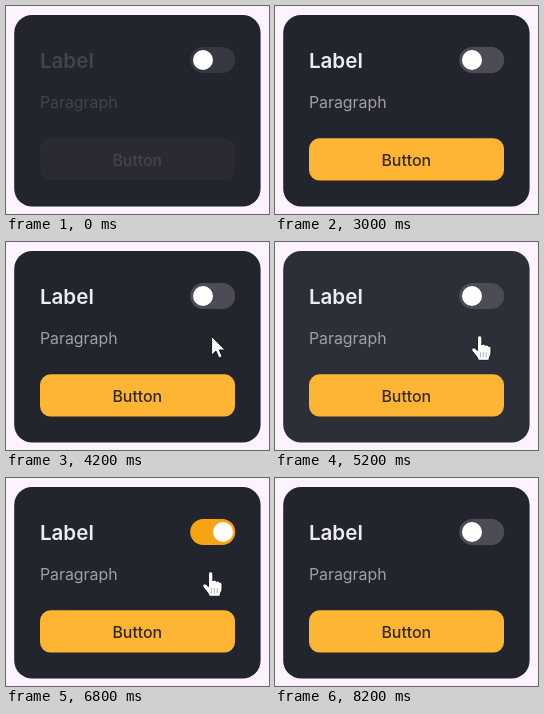
Animation, 263 px wide and 208 px high, one loop 8.9 s. Source, as an HTML page:

```html
<!DOCTYPE html>
<html lang="en">
<head>
<meta charset="utf-8">
<title>Card states</title>
<style>
  html, body { margin: 0; width: 100%; height: 100%; overflow: hidden; background: #fdf3fe; }
  svg { display: block; width: 100vw; height: 100vh; }
  text { font-family: Inter, Roboto, sans-serif; font-size: 15.9px; }
  .cursor path { fill: #fff; stroke: #15161c; stroke-width: 1; stroke-linejoin: round; }
  .cursor .crease { fill: none; stroke: #8b8b92; stroke-width: .7; stroke-linecap: round; }
</style>
</head>
<body>
<svg viewBox="0 0 263 208">
  <rect id="card" x="8.2" y="9" width="246.4" height="191.5" rx="18"/>
  <text id="label" x="33.9" y="62.2" style="font-size:20.6px;font-weight:600">Label</text>
  <text id="para" x="33.9" y="102.3">Paragraph</text>
  <rect id="track" x="184.2" y="41" width="45" height="26" rx="13"/>
  <circle id="knob" cy="54" r="10" fill="#fff"/>
  <rect id="button" x="34" y="132.3" width="195" height="42.3" rx="10.5"/>
  <text id="caption" x="131.3" y="160" text-anchor="middle" style="font-weight:500">Button</text>
  <g id="arrow" class="cursor">
    <path d="M.6 .4V19.2L5 15.1L7.9 22L11.2 20.6L8.3 14H14.2Z"/>
  </g>
  <g id="hand" class="cursor">
    <path d="M-2.6 2C-2.6 -.9 1.9 -.9 1.9 2V9C2.2 7.7 5.2 7.8 5.5 9.6C6 8.5 8.4 8.8 8.7 10.5C9.4 9.8 11 10.4 11 12.3V17C11 19.4 9 20.6 9 24.3H-1.8C-2 21.5 -4.5 19.5 -7.6 15.3C-9.4 12.7 -6.6 10.8 -4.6 12.6L-2.6 14.6Z"/>
    <path class="crease" d="M.4 16.5V21M3.3 16.5V21M6.2 16.5V21"/>
  </g>
</svg>
<script>
const LOOP = 8900;
const $ = id => document.getElementById(id);
const dark = [34, 36, 46], light = [45, 47, 56];
const trackOff = [77, 75, 85], trackOn = [247, 164, 20];

const ramp = (t, from, to) => Math.min(1, Math.max(0, (t - from) / (to - from)));
const smooth = p => p * p * (3 - 2 * p);
const pulse = (t, a, b, c, d) => smooth(ramp(t, a, b)) - smooth(ramp(t, c, d));
const mix = (a, b, p) => `rgb(${a.map((v, i) => v + (b[i] - v) * p)})`;
const fill = (id, color) => $(id).setAttribute("fill", color);

function placeCursor(t) {
  // slides in from the right, rests, then leaves the same way
  const away = (1 - ramp(t, 3350, 3700)) ** 2 + ramp(t, 7500, 7850) ** 2;
  const at = `translate(${205 + 80 * away} ${94 + 30 * away})`;
  const visible = t >= 3350 && t < 7850, hovering = t >= 4800;
  for (const [id, shown] of [["arrow", !hovering], ["hand", hovering]]) {
    $(id).setAttribute("transform", at);
    $(id).setAttribute("visibility", visible && shown ? "visible" : "hidden");
  }
}

function draw(t) {
  const enabled = t >= 2300;
  const hover = pulse(t, 4750, 5150, 7500, 8000);
  const on = pulse(t, 5200, 5650, 6800, 7200);

  fill("card", mix(dark, light, hover * (1 - on)));
  fill("label", enabled ? "#eeecf1" : "#43444d");
  fill("para", enabled ? "#a19ea8" : "#43444d");
  fill("button", enabled ? "#ffb534" : "#292a33");
  fill("caption", enabled ? "#32291f" : "#43444d");
  fill("track", enabled ? mix(trackOff, trackOn, on) : "#363740");
  $("knob").setAttribute("cx", 197 + 20 * on);
  placeCursor(t);
}

function tick(now) {
  draw(now % LOOP);
  requestAnimationFrame(tick);
}
draw(0);
requestAnimationFrame(tick);
</script>
</body>
</html>
```
